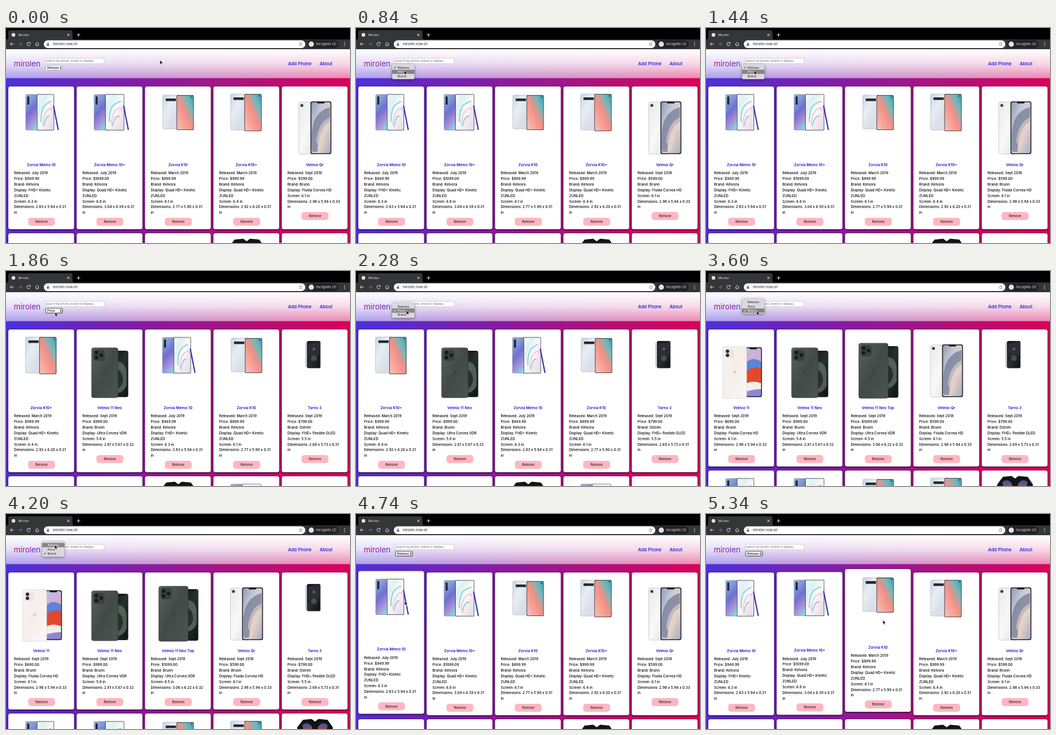
Recreate the animation shown at these times as an HTML page. Size 600 by 375 pixels, loop 5400 ms.

```html
<!DOCTYPE html>
<html lang="en">
<head>
<meta charset="utf-8">
<title>Mirolen</title>
<style>
html, body { margin: 0; width: 100%; height: 100%; overflow: hidden; background: #000; }
svg { display: block; width: 600px; height: 375px; font-family: Inter, sans-serif; }
.card > rect:first-child { filter: drop-shadow(0 1px 1.8px #000d); }
.card { font-weight: 500; }
.popup > rect:first-child { filter: drop-shadow(0 1px 2px #0007); }
.line { fill: none; stroke: #dfe1e5; stroke-width: 1; }
</style>
</head>
<body>
<svg viewBox="0 0 600 375">
  <defs id="defs"></defs>
  <rect y="37" width="600" height="338" fill="url(#page)"/>
  <g id="cards"></g>
  <rect y="37" width="600" height="50.5" fill="url(#header)"/>
  <g id="site"></g>
  <g id="browser"></g>
  <g id="menu"></g>
  <path id="cursor" d="M0 0V7.2L1.7 5.7L2.8 8.2L4 7.7L2.9 5.3H5.2Z" stroke="#fff" stroke-width=".6"/>
</svg>
<script>
const LOOP = 5400, STEP = 60;
const $ = id => document.getElementById(id);

const rect = (x, y, w, h, fill, r = 0, more = '') =>
  `<rect x="${x}" y="${y}" width="${w}" height="${h}" rx="${r}" fill="${fill}" ${more}/>`;
const circle = (x, y, r, fill) => `<circle cx="${x}" cy="${y}" r="${r}" fill="${fill}"/>`;
const path = (d, more = 'class="line"') => `<path d="${d}" ${more}/>`;
const text = (x, y, size, fill, str, more = '') =>
  `<text x="${x}" y="${y}" font-size="${size}" fill="${fill}" ${more}>${str}</text>`;

// name: [x2, y2, ...colours]
const gradients = {
  page: [1, .08, '#4a32da', '#7a1fae', '#a8147f', '#d9005b'],
  header: [0, 1, '#ffffff', '#ffffffd8', '#ffffff88'],
  logo: [1, 0, '#b0127c', '#8a1c9c', '#4d2cc4'],
  aura: [.5, 1, '#9fb4cc', '#7f9ad6', '#6f6fd0', '#a48ad8', '#8fd0dc'],
  swirl: [1, 1, '#f4f8f8', '#dcf2f2', '#fbf8fa', '#f6e2ec', '#c4e8ec'],
  frost: [1, 1, '#c4d4e2', '#e8edf2', '#d8dfea', '#ecd9dc'],
  coral: [-.6, 1, '#3f9fb4', '#74b8bc', '#f48f84', '#f7a69c', '#f3c4c0'],
  silver: [1, 1, '#e8e9eb', '#f8f8f9', '#dcdee2'],
  dusk: [1, 1, '#8f9cb8', '#c9cad6', '#e0cfc8', '#a4adc2'],
  moss: [1, 1, '#59625d', '#424a47', '#4c5551'],
  night: [1, 1, '#101413', '#26302c', '#0f1312'],
  cream: [1, 1, '#f9f4f1', '#f5eeeb', '#fbf8f6'],
  candy: [.3, 1, '#a9c4ea', '#c8b4e0', '#d9a8cc', '#b49ad6', '#8f86d0'],
  flare: [0, 1, '#2f4ea8', '#d8502c', '#f08a3c']
};
$('defs').innerHTML = Object.entries(gradients).map(([id, [x2, y2, ...colours]]) =>
  `<linearGradient id="${id}" x1="${x2 < 0 ? 1 : 0}" x2="${x2 < 0 ? 0 : x2}" y1="0" y2="${y2}">` +
  colours.map((c, i) => `<stop offset="${i / (colours.length - 1)}" stop-color="${c}"/>`).join('') +
  '</linearGradient>').join('');

const back = (x, y, w, h, fill, edge, r = 3.5) =>
  rect(x, y, w, h, `url(#${fill})`, r, `stroke="${edge}" stroke-width=".7"`);
const front = (x, y, w, h, fill, rim = 1, r = 3.5) =>
  rect(x, y, w, h, '#23262b', r) +
  rect(x + rim, y + rim, w - 2 * rim, h - 2 * rim, `url(#${fill})`, r - .5);
const notch = (x, y) => rect(x, y, 13, 2.6, '#16181b', 1.3);

const penPhone = (w, h) =>
  back(30.5, 14, 28, h - 1, 'aura', '#7882a8', 1.5) +
  rect(33, 17, 3.6, 15, '#20233a', 1.8) +
  front(50, 13.5, w - 20, h, 'swirl', .7, 1.5) +
  path(`M57 62Q57 38 65 32T${w + 25} 26M62 70Q66 50 ${w + 22} 52`, 'fill="none" stroke="#5fc4c8" stroke-width="2" opacity=".7"') +
  path(`M60 66Q62 46 70 40T${w + 26} 42`, 'fill="none" stroke="#e8a8cc" stroke-width="2" opacity=".6"') +
  path(`M${w + 29} 34L${w + 37} ${h + 12}`, 'stroke="#3a34b4" stroke-width="2.2" stroke-linecap="round"');
const slimPhone = (x, y, h) =>
  back(x, y, 31, h - 2, 'frost', '#aab7c4', 2.5) +
  rect(x + 5, y + 6, 18, 4.6, '#252a31', 1.2) +
  front(x + 24, y, 30, h, 'coral', .8, 2.5) + circle(x + 50, y + 3.5, 1.1, '#222');
const proPhone = (x, y, w, h) =>
  front(x + w - 32, y + 5, 32, h - 6, 'night', 1.2) +
  path(`M${x + w - 18} ${y + 24}q14 2 15 20v22q-4 10 -15 13z`, 'fill="#5f7268" opacity=".75"') +
  path(`M${x + w - 18} ${y + 38}q8 4 9 18q-2 12 -9 15z`, 'fill="#27302d"') + notch(x + w - 19, y + 6) +
  back(x, y, w - 18, h, 'moss', '#353c39') +
  rect(x + 3, y + 3, 20, 20, '#39423e', 5) +
  [[8.5, 8.5], [8.5, 17], [17, 12.8]].map(([a, b]) => circle(x + a, y + b, 3.2, '#171b1a')).join('') +
  circle(x + (w - 18) / 2, y + h / 2, 2.8, '#3b4440');

const art = {
  pen: penPhone(50, 63),
  penPlus: penPhone(53, 63),
  slim: slimPhone(31, 15, 61),
  slimPlus: slimPhone(30, 13, 65),
  light: back(29.5, 27, 33, 91, 'silver', '#b9bcc2') + circle(35, 33, 2.6, '#3a3d44') +
    front(50, 26, 36.5, 92, 'dusk', 1.6) + notch(61.5, 27) +
    path('M52 84Q54 44 84 36V62Q66 68 62 114H55Q52 114 52 108Z', 'fill="#5c6a8c" opacity=".6"') +
    path('M60 96Q64 62 84 54V72Q72 78 68 112Z', 'fill="#e8d4cc" opacity=".6"'),
  pro: proPhone(26, 32, 64, 87),
  proMax: proPhone(24, 24, 69, 96),
  white: front(57, 31, 36.5, 87, 'candy', 1.5) + notch(72, 32) +
    path('M66 72Q78 60 92 66V92Q80 100 66 92Z', 'fill="#e2482e"') +
    path('M66 58Q76 46 92 56V68Q78 62 66 74Z', 'fill="#5a86d8"') +
    path('M66 94Q80 88 92 94V104Q80 104 66 108Z', 'fill="#f2f0ea"') +
    back(25, 30, 42, 90, 'cream', '#d8cec9') + rect(28, 33, 17, 17, '#ece4e0', 5) +
    circle(33.5, 38, 3, '#2a2a30') + circle(33.5, 45, 3, '#2a2a30') + circle(46, 74, 2.6, '#d9d0cc'),
  small: rect(41, 22, 13, 44, '#c8cacc', 2) + front(44, 20, 23.5, 47.5, 'night', .9, 2.5) +
    path('M46 24H65.5V46Q56 40 46 48Z', 'fill="#2c2e36"') + circle(56, 50, 5, '#54484e') + circle(56, 34, 2.5, '#5a5c66'),
  fold: path('M27 24L37 11L52 9.5L58 14L64 9.5L80 11L89 24V60H27Z', 'fill="#121316"') +
    path('M36 20Q46 12 53 24V50H46Q38 34 36 20ZM63 24Q70 12 80 20Q78 34 70 50H63Z', 'fill="url(#flare)"')
};

const kinetic = 'Quad HD+ Kinetic|ZUNLED', fluida = 'Fluida Corvea HD', ultra = 'Ultra Corvea VDR';
const phones = {
  pen: ['Zorvia Memo 10', 'July 2019', '949.99', 'Kelvora', 'FHD+ Kinetic|ZUNLED', '6.3', '2.83 x 5.94 x 0.31'],
  penPlus: ['Zorvia Memo 10+', 'July 2019', '1099.09', 'Kelvora', kinetic, '6.8', '3.04 x 6.39 x 0.31'],
  slim: ['Zorvia K10', 'March 2019', '899.99', 'Kelvora', kinetic, '6.1', '2.77 x 5.90 x 0.31'],
  slimPlus: ['Zorvia K10+', 'March 2019', '999.99', 'Kelvora', kinetic, '6.4', '2.92 x 6.20 x 0.31'],
  light: ['Velmio Qr', 'Sept 2018', '599.00', 'Brunn', fluida, '6.1', '2.98 x 5.94 x 0.33'],
  white: ['Velmio 11', 'Sept 2019', '690.00', 'Brunn', fluida, '6.1', '2.98 x 5.94 x 0.33'],
  pro: ['Velmio 11 Neo', 'Sept 2019', '999.00', 'Brunn', ultra, '5.8', '2.81 x 5.67 x 0.32'],
  proMax: ['Velmio 11 Neo Top', 'Sept 2019', '1099.00', 'Brunn', ultra, '6.5', '3.06 x 6.22 x 0.32'],
  small: ['Tarno 3', 'Sept 2019', '799.00', 'Ostrim', 'FHD+ flexible OLED', '5.5', '2.69 x 5.73 x 0.31']
};
const details = id => {
  const [, released, price, brand, display, screen, size] = phones[id];
  return [`Released: ${released}`, `Price: $${price}`, `Brand: ${brand}`,
    ...`Display: ${display}`.split('|'), `Screen: ${screen} in`, `Dimensions: ${size}`, 'in'];
};

const options = ['Release', 'Price', 'Brand'];
const orders = [
  'pen penPlus slim slimPlus light white pro proMax fold small',
  'slimPlus pro pen slim small white light fold penPlus proMax',
  'white pro proMax light small pen penPlus slim slimPlus fold'
].map(s => s.split(' '));

// time, x, y
const moves = [
  [0, 268.5, 56], [120, 268.5, 56], [540, 84, 69], [660, 84, 69], [780, 84, 74], [1740, 84, 74],
  [2040, 88, 69], [2340, 88, 69], [2520, 88, 76], [2760, 88, 76], [3060, 88.5, 70], [3660, 88.5, 70],
  [4020, 85, 54], [4260, 85, 54], [4440, 85, 62], [4600, 85, 62], [4740, 85, 152], [5340, 308.5, 185], [LOOP, 308.5, 185]
];
const opened = [[540, 1740], [2160, 2760], [3420, 4260]];
const hovers = [[4670, 4830], [4830, 5155], [5155, LOOP + 999]];

function cursorAt(t) {
  const i = moves.findIndex(m => m[0] > t);
  const [t0, x0, y0] = moves[i - 1], [t1, x1, y1] = moves[i];
  const p = (t - t0) / (t1 - t0);
  return [x0 + (x1 - x0) * p, y0 + (y1 - y0) * p];
}

// CSS "ease" over 300 ms
function ease(ms) {
  const x = Math.min(1, Math.max(0, ms / 300));
  let lo = 0, hi = 1, s = .5;
  for (let i = 0; i < 16; i++) {
    s = (lo + hi) / 2;
    const bx = .75 * s * (1 - s) ** 2 + .75 * s * s * (1 - s) + s ** 3;
    if (bx < x) lo = s; else hi = s;
  }
  return .3 * s * (1 - s) ** 2 + 3 * s * s * (1 - s) + s ** 3;
}
const lift = (t, i) => hovers[i] ? 6.6 * (ease(t - hovers[i][0]) - ease(t - hovers[i][1])) : 0;

function card(id, i, height, t) {
  const x = 4 + 119.25 * (i % 5), y = i < 5 ? 102 - lift(t, i) : 109 + height;
  let body = rect(0, 0, 114.7, height, '#fff', 3.5) + art[id];
  if (i < 5) {
    const lines = details(id), top = 150 + 9.86 * lines.length;
    body += text(57.5, 138.6, 6.5, '#1610d6', phones[id][0], 'text-anchor="middle" font-weight="600"') +
      lines.map((s, n) => text(10, 153.3 + 9.86 * n, 6.2, '#000', s)).join('') +
      rect(34.5, top, 47, 14, '#ffb6c1', 5) +
      text(58, top + 9.2, 5.6, '#222', 'Remove', 'text-anchor="middle"');
  }
  return `<g class="card" transform="translate(${x} ${y})">${body}</g>`;
}

function menu(t, sort, y) {
  if (!opened.some(([a, b]) => t >= a && t < b)) {
    const focused = t >= 540;
    return rect(69, 65, 29.5, 8.3, '#f6f6f6', 1.5, `stroke="${focused ? '#555' : '#999'}" stroke-width="${focused ? 1.2 : .6}"`) +
      text(72, 71.2, 5.4, '#111', options[sort], 'font-weight="500"') +
      path('M94 68.6L95.5 66.4L97 68.6ZM94 69.8L95.5 72L97 69.8Z', 'fill="#222"');
  }
  const top = 62.7 - 7.4 * sort, active = sort + Math.round((y - 69) / 7.4);
  return `<g class="popup">${rect(63, top, 39, 26.5, '#dcd7df', 2.5)}` + options.map((name, i) => {
    const mid = 69 + 7.4 * (i - sort), ink = i === active ? '#fff' : '#222';
    return (i === active ? rect(63, mid - 3.7, 39, 7.4, '#858585') : '') +
      (i === sort ? path(`M66 ${mid}l1.4 1.7l2.4 -3.8`, `fill="none" stroke="${ink}" stroke-width=".8"`) : '') +
      text(72.5, mid + 2, 5.4, ink, name);
  }).join('') + '</g>';
}

$('site').innerHTML =
  text(13.5, 66.5, 13.4, 'url(#logo)', 'mirolen') +
  rect(68.5, 53, 102.5, 9, '#fff', 0, 'stroke="#bbb" stroke-width=".6"') +
  text(69.5, 59.4, 5.15, '#666', 'search by phone, brand or display...') +
  text(492, 65.2, 7.8, '#1510e0', 'Add Phone', 'font-weight="500"') +
  text(547, 65.2, 7.8, '#1510e0', 'About', 'font-weight="500"');

$('browser').innerHTML =
  rect(0, 0, 600, 20, '#000') + rect(0, 20, 600, 17, '#35363a') +
  path('M1 20.5Q4 20 4 16V7Q4 4 7 4H113Q116 4 116 7V16Q116 20 119 20.5Z', 'fill="#35363a"') +
  circle(13, 12, 3.2, '#dfe1e5') + text(21.5, 13.9, 5.3, '#e8eaed', 'Mirolen') +
  path('M106.8 10l4 4m0 -4l-4 4M123.5 12h6m-3 -3v6') +
  path('M13.5 28H7.5m2.8 -2.8L7.5 28l2.8 2.8') +
  path('M22 28h6m-2.8 -2.8L28 28l-2.8 2.8', 'fill="none" stroke="#77797d"') +
  path('M41.6 26.2A2.9 2.9 0 1 0 42 29M42.2 24.6v2.2h-2.2') +
  path('M51 28.2l3.3 -3l3.3 3M52.2 28v2.8h4.2V28') +
  rect(66, 21.5, 456, 13.5, '#fff', 6.7) +
  rect(71.2, 27.4, 4, 3.4, '#5f6368', .5) + path('M72 27.4v-1a1.2 1.2 0 0 1 2.4 0v1', 'fill="none" stroke="#5f6368" stroke-width=".7"') +
  text(81.5, 30.1, 6.1, '#202124', 'mirolen.now.sh') +
  path('M514 25l.9 2 2.2.2-1.7 1.5.5 2.2-1.9-1.2-1.9 1.2.5-2.2-1.7-1.5 2.2-.2Z', 'fill="none" stroke="#5f6368" stroke-width=".6"') +
  rect(525.5, 21.5, 54.5, 13.5, '#202124', 6.7) + circle(532.5, 28.2, 4.6, '#dfe1e5') +
  text(541, 30.2, 5.9, '#e8eaed', 'Incognito (2)') +
  [25.5, 28.2, 30.9].map(y => circle(590.5, y, .8, '#dfe1e5')).join('');

function draw(t) {
  const sort = t < 1740 || t >= 4260 ? 0 : t < 2760 ? 1 : 2;
  const order = orders[sort], [x, y] = cursorAt(t);
  const rows = Math.max(...order.slice(0, 5).map(id => details(id).length));
  $('cards').innerHTML = order.map((id, i) => card(id, i, 170 + 9.86 * rows, t)).join('');
  $('menu').innerHTML = menu(t, sort, y);
  $('cursor').setAttribute('transform', `translate(${x} ${y})`);
}

const start = performance.now();
let shown = -1;
function tick() {
  const t = Math.floor((performance.now() - start) % LOOP / STEP) * STEP;
  if (t !== shown) draw(shown = t);
  requestAnimationFrame(tick);
}
tick();
</script>
</body>
</html>
```
